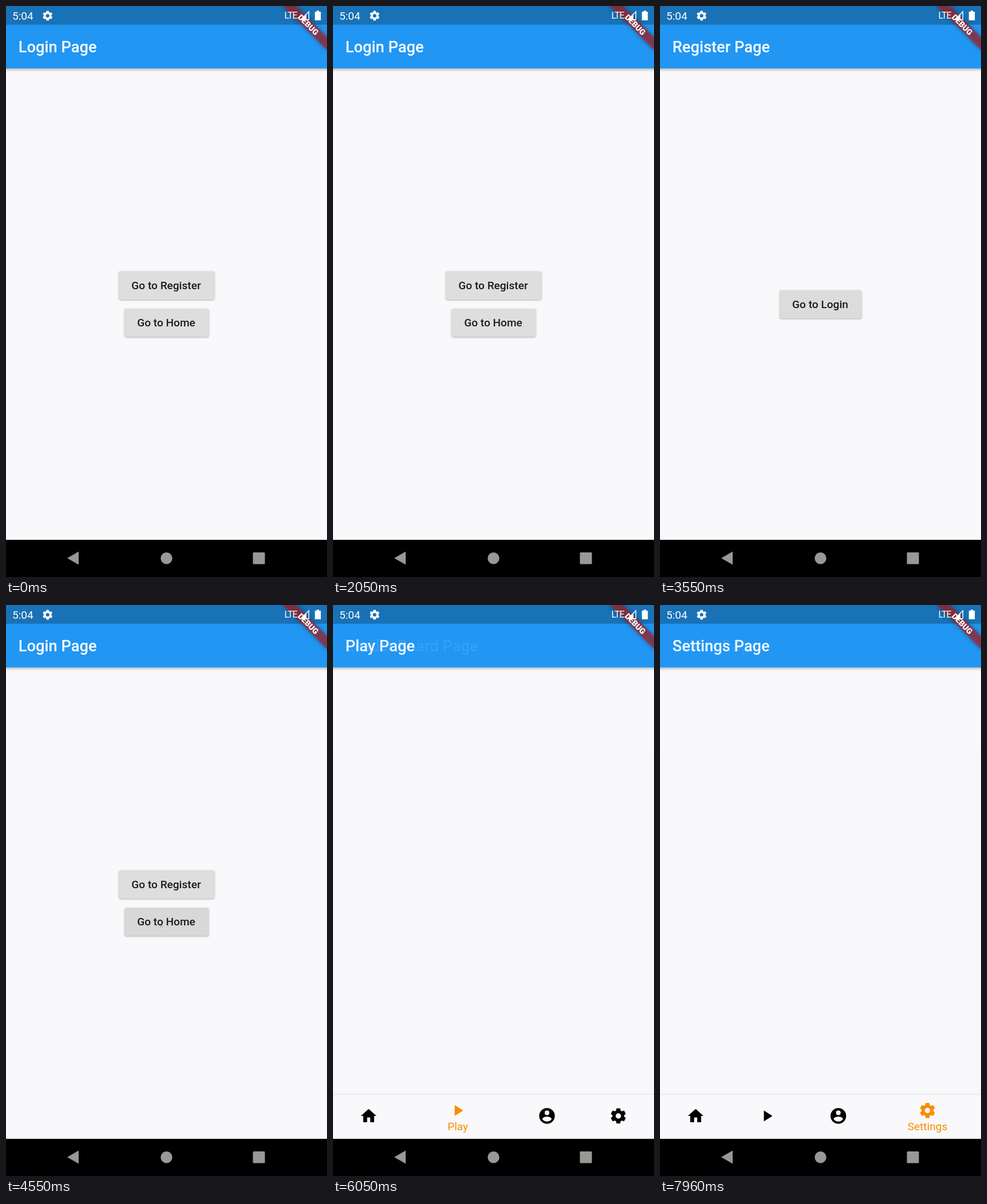
Write an HTML page that moves like this. It is 561 px wide and 998 px high and loops after 8000 ms.

```html
<!DOCTYPE html>
<html lang="en">
<head>
<meta charset="utf-8">
<title>Page navigation</title>
<style>
  html, body { margin: 0; width: 100%; height: 100%; overflow: hidden; background: #000; }
  svg#stage { display: block; width: 100vw; height: 100vh; }
  text { font-family: Roboto, sans-serif; }
  .title { font-size: 27.27px; font-weight: 500; fill: #fff; }
  .label { font-size: 19.09px; font-weight: 500; fill: #1c1c1c; text-anchor: middle; }
  .tab { font-size: 19.09px; fill: #fb8c00; text-anchor: middle; }
  .bar { filter: drop-shadow(0 2px 2.5px rgba(0, 0, 0, .32)); }
  .raised { filter: drop-shadow(0 1.8px 1.4px rgba(0, 0, 0, .3)); }
  .banner { filter: drop-shadow(0 0 4px rgba(0, 0, 0, .5)); }
</style>
</head>
<body>
<svg id="stage" viewBox="0 0 561 998">
  <g id="pages"></g>
  <g id="nav"></g>
  <g id="system"></g>
</svg>
<script>
const LOOP = 8000, DP = 561 / 411.43;
const RELEASE = 200, FADE = 450, W = 561;
const BG = '#f9f9fb';
const $ = id => document.getElementById(id);
const clamp = v => Math.max(0, Math.min(1, v));
const ramp = (t, start, length) => clamp((t - start) / length);
const mix = (a, b, k) => a + (b - a) * k;
const ease = x => x < .5 ? 4 * x ** 3 : 1 - (2 - 2 * x) ** 3 / 2;

// Icons on a 24-unit grid
function gearPath() {
  const pts = [];
  for (let k = 0; k < 6; k++) {
    for (const [r, deg] of [[7.5, -22.5], [10, -13.5], [10, 13.5], [7.5, 22.5]]) {
      const a = (k * 60 + deg) * Math.PI / 180;
      pts.push((12 + r * Math.sin(a)).toFixed(2) + ' ' + (12 - r * Math.cos(a)).toFixed(2));
    }
  }
  return 'M' + pts.join('L') + 'ZM12 8.5a3.5 3.5 0 1 0 0 7a3.5 3.5 0 1 0 0-7Z';
}
const ICONS = {
  home: 'M10 20v-6h4v6h5v-8h3L12 3 2 12h3v8z',
  play: 'M8 5v14l11-7z',
  person: 'M12 2a10 10 0 1 0 0 20a10 10 0 1 0 0-20zm0 3a3 3 0 1 1 0 6a3 3 0 1 1 0-6z' +
    'm0 14.2c-2.5 0-4.71-1.28-6-3.22.03-1.99 4-3.08 6-3.08 1.99 0 5.97 1.09 6 3.08-1.29 1.94-3.5 3.22-6 3.22z',
  gear: gearPath()
};
const iconAt = (x, y, s) => `translate(${x} ${y}) scale(${s}) translate(-12 -12)`;
const icon = (name, attrs) => `<path d="${ICONS[name]}" fill-rule="evenodd" ${attrs}/>`;

const loginButtons = [['Go to Register', 488.4, 167], ['Go to Home', 553.8, 147]];
const PAGES = [
  { title: 'Login Page', buttons: loginButtons },
  { title: 'Register Page', buttons: [['Go to Login', 521.4, 143]] },
  { title: 'Login Page', buttons: loginButtons },
  { title: 'Leader Board Page' },
  { title: 'Play Page' },
  { title: 'Profile Page' },
  { title: 'Settings Page' }
];
const TABS = [['home', 'Home'], ['play', 'Play'], ['person', 'Profile'], ['gear', 'Settings']];

// Each tap opens the next page
const TAPS = [
  { at: 2560, x: 276, y: 494, button: 0 },
  { at: 3540, x: 274, y: 528, button: 0 },
  { at: 4517, x: 271, y: 561, button: 1 },
  { at: 5440, x: 232, y: 897, tab: 1 },
  { at: 6390, x: 354, y: 897, tab: 2 },
  { at: 7345, x: 467, y: 897, tab: 3 }
];

function button([text, cy, w], id) {
  const x = 280.8 - w / 2, y = cy - 24.6;
  return `<rect class="raised" x="${x}" y="${y}" width="${w}" height="49.1" rx="2.7" fill="#dedede"/>
    <svg x="${x}" y="${y}" width="${w}" height="49.1" viewBox="${x} ${y} ${w} 49.1">
      <rect id="${id}-hi" x="${x}" y="${y}" width="${w}" height="49.1" rx="2.7" opacity="0"/>
      <circle id="${id}-ink" r="0" opacity="0"/>
    </svg>
    <text class="label" x="280" y="${cy + 6.6}">${text}</text>`;
}

function page({ title, buttons = [] }, i) {
  return `<g id="page${i}">
    <rect y="32" width="${W}" height="901" fill="${BG}"/>
    <rect class="bar" x="-10" y="-10" width="581" height="119" fill="#2196f3"/>
    <text class="title" x="21.8" y="81.4">${title}</text>
    ${buttons.map((b, k) => button(b, `b${i}${k}`)).join('')}
  </g>`;
}

function build() {
  $('pages').innerHTML = PAGES.map(page).join('');

  $('nav').innerHTML = `
    <rect y="855" width="${W}" height="78" fill="${BG}"/>
    <rect y="854" width="${W}" height="2.5" fill="#000" opacity=".045"/>
    <circle id="tab-hi" cy="893" r="47.7" fill="#bcbcbc" opacity="0"/>
    <circle id="tab-ink" fill="#a8a8a8" opacity="0"/>` +
    TABS.map(([name, text], i) => icon(name, `id="icon${i}"`) +
      `<text class="tab" id="tab${i}" y="917.5">${text}</text>`).join('');

  $('system').innerHTML = `
    <rect width="${W}" height="32.7" fill="#000" opacity=".25"/>
    <g transform="translate(561 0) rotate(45)">
      <rect class="banner" x="-54.5" y="38.2" width="109" height="16.4" fill="#b71c1c" fill-opacity=".63"/>
      <text y="51.2" text-anchor="middle" font-size="13.9" font-weight="900" fill="#fff">DEBUG</text>
    </g>
    <g fill="#fff">
      <text x="11" y="24" font-size="19.1">5:04</text>
      ${icon('gear', `transform="${iconAt(72.7, 17, .88)}"`)}
      <text x="486.5" y="22" font-size="16" letter-spacing="-1">LTE</text>
      <path d="M513.5 24.5L525 13.5V24.5Z"/>
      <path d="M515 24L529.3 10V24Z" fill="none" stroke="#fff" stroke-width="1.5"/>
      <path d="M543 8h4v2h3.2v15h-10.4v-15h3.2z"/>
    </g>
    <rect y="933" width="${W}" height="65"/>
    <g fill="#999894">
      <path d="M107 965L127 953.5V976.5Z"/>
      <circle cx="280.5" cy="965.3" r="10.2"/>
      <rect x="431.5" y="955" width="21" height="20.6" rx="1.5"/>
    </g>`;
}

const set = (el, attrs) => {
  for (const k in attrs) el.setAttribute(k, attrs[k]);
};

// Highlight level, splash radius and splash level at a time since touch-down
function press(dt, full) {
  if (dt < 0 || dt > 500) return { hi: 0, r: 0, ink: 0 };
  const held = full * Math.min(dt, RELEASE) / 1000;
  const out = 1 - ramp(dt, RELEASE, 200);
  return {
    hi: ramp(dt, 0, 200) * out,
    r: mix(held, full, ramp(dt, RELEASE, full)),
    ink: out
  };
}

function drawTabs(t) {
  const weights = TABS.map((_, i) => i ? 0 : 1);
  for (const tap of TAPS) {
    if (!tap.tab) continue;
    const k = ease(ramp(t, tap.at + RELEASE, 200));
    weights[tap.tab] = k;
    weights[tap.tab - 1] *= 1 - k;
  }
  const total = weights.reduce((sum, w) => sum + 1 + w / 2, 0);
  const centers = [];
  let left = 0;
  weights.forEach((w, i) => {
    const width = W * (1 + w / 2) / total;
    const cx = centers[i] = left + width / 2;
    left += width;
    set($('icon' + i), {
      transform: iconAt(cx, 893 - 9.5 * w, DP),
      fill: `rgb(${251 * w},${140 * w},0)`
    });
    set($('tab' + i), { x: cx, opacity: w });
  });
  return centers;
}

function draw(t) {
  PAGES.forEach((_, i) => {
    const shown = i ? ramp(t, TAPS[i - 1].at + RELEASE, FADE) : 1;
    set($('page' + i), { opacity: shown });
    if (i === 3) set($('nav'), { opacity: shown });
  });

  const centers = drawTabs(t);
  let tabHi = 0, tabInk = 0;
  TAPS.forEach((tap, i) => {
    const dt = t - tap.at;
    if (tap.tab) {
      const p = press(dt, 47.7);
      if (!p.ink) return;
      const cx = centers[tap.tab], k = p.r / 47.7;
      tabHi = p.hi * .4;
      tabInk = p.ink * .4;
      set($('tab-hi'), { cx });
      set($('tab-ink'), { cx: mix(tap.x, cx, k), cy: mix(tap.y, 893, k), r: p.r });
    } else {
      const p = press(dt, 90), id = `b${i}${tap.button}`;
      set($(id + '-hi'), { opacity: p.hi * .16 });
      set($(id + '-ink'), { cx: tap.x, cy: tap.y, r: p.r, opacity: p.ink * .12 });
    }
  });
  set($('tab-hi'), { opacity: tabHi });
  set($('tab-ink'), { opacity: tabInk });
}

build();
const begin = performance.now();
function tick() {
  draw((performance.now() - begin) % LOOP);
  requestAnimationFrame(tick);
}
tick();
</script>
</body>
</html>
```
